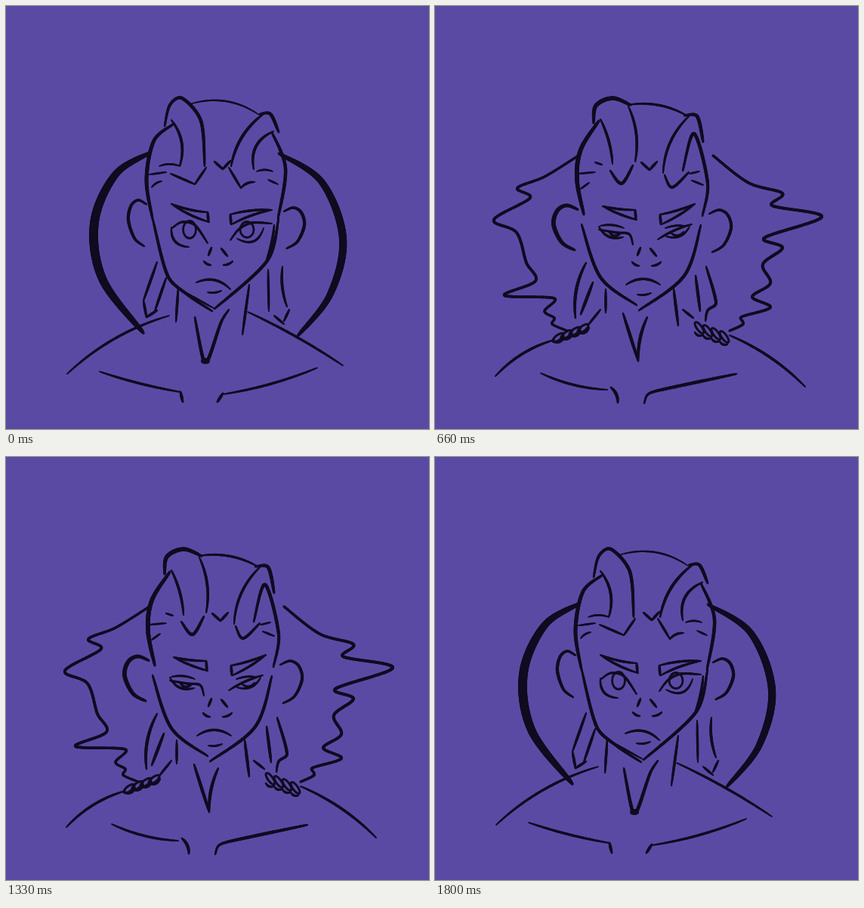
Recreate the animation shown at these times as an HTML page with a canvas. Size 560 by 560 pixels, loop 2 s.

```html
<!DOCTYPE html>
<html lang="en">
<head>
<meta charset="utf-8">
<title>Sketch portrait</title>
<style>
html, body { margin: 0; width: 100%; height: 100%; overflow: hidden; background: #5b4aa4; }
canvas { display: block; }
</style>
</head>
<body>
<canvas id="stage" width="560" height="560"></canvas>
<script>
const ctx = document.getElementById('stage').getContext('2d');
const PAPER = '#5b4aa4', INK = '#110b20', PRESSURE = 1.12;

// Bezier handle along a -> c, never longer than the span allows
function handle(a, c, span) {
  const dx = c[0] - a[0], dy = c[1] - a[1], len = Math.hypot(dx, dy) || 1;
  const k = Math.min(len / 6, span * 0.35) / len;
  return [dx * k, dy * k];
}

// Smooth line through a few points
function through(flat) {
  const pts = [];
  for (let i = 0; i < flat.length; i += 2) pts.push([flat[i], flat[i + 1]]);
  const at = i => pts[Math.max(0, Math.min(pts.length - 1, i))];
  const out = [pts[0]];
  for (let i = 0; i < pts.length - 1; i++) {
    const a = pts[i], b = pts[i + 1], span = Math.hypot(b[0] - a[0], b[1] - a[1]);
    const ha = handle(at(i - 1), b, span), hb = handle(a, at(i + 2), span);
    const steps = Math.ceil(span / 2);
    for (let s = 1; s <= steps; s++) {
      const u = s / steps, v = 1 - u;
      out.push([0, 1].map(k => v * v * v * a[k] + 3 * v * v * u * (a[k] + ha[k]) +
        3 * v * u * u * (b[k] - hb[k]) + u * u * u * b[k]));
    }
  }
  return out;
}

// Brush line: width w in the middle, thinning to the share "tip" at both ends
function brush(w, tip, pts) {
  const n = pts.length - 1;
  for (let i = 0; i < n; i++) {
    const press = Math.sqrt(Math.sin(Math.PI * (i + 0.5) / n));
    ctx.lineWidth = PRESSURE * w * (tip + (1 - tip) * press);
    ctx.beginPath();
    ctx.moveTo(...pts[i]);
    ctx.lineTo(...pts[i + 1]);
    ctx.stroke();
  }
}
const ink = (w, ...flat) => brush(w, 0.45, through(flat));
const even = (w, ...flat) => brush(w, 0.8, through(flat));
const swell = (w, ...flat) => brush(w, 0.2, through(flat));

// Arched line; a positive bend bulges to the left of the way it runs
function bow(w, x0, y0, x1, y1, bend = 0) {
  const dx = x1 - x0, dy = y1 - y0, n = Math.ceil(Math.hypot(dx, dy) / 2), pts = [];
  for (let i = 0; i <= n; i++) {
    const t = i / n, lift = 4 * t * (1 - t) * bend;
    pts.push([x0 + dx * t + dy * lift, y0 + dy * t - dx * lift]);
  }
  brush(w, 0.45, pts);
}

function oval(w, x, y, rx, ry, turn = 0) {
  ctx.lineWidth = w;
  ctx.beginPath();
  ctx.ellipse(x, y, rx, ry, turn, 0, 7);
  ctx.stroke();
}

// Shared parts of the face
function ear(w, x, y, reach, h) {
  ink(w, x, y + h * 0.09, x + reach * 0.46, y, x + reach * 0.85, y + h * 0.12,
    x + reach, y + h * 0.43, x + reach * 0.66, y + h * 0.83, x + reach * 0.13, y + h);
}

function brow(x, y, inX, inY, bend) {
  bow(3, x, y, inX, inY, bend);
  bow(3, x, y, inX + 2, inY + 13, bend);
  bow(3.3, inX, inY, inX + 1, inY + 13);
}

function peak(x, y) {
  bow(3.2, x - 11, y - 10, x, y);
  bow(3.2, x, y, x + 10, y - 11);
}

function noseBridge() {
  bow(3.2, 272, 320, 268, 330);
  bow(3.2, 285, 321, 293, 331);
}

function noseAndMouth(x, y, mouthX, mouthY, drop) {
  bow(3, x, y, x + 9, y + 5, -0.1);
  bow(3, x + 26, y + 5, x + 38, y, -0.1);
  bow(3.1, mouthX, mouthY, mouthX + 45, mouthY + drop, 0.17);
  bow(2.6, mouthX + 15, mouthY + 13, mouthX + 33, mouthY + 11, -0.08);
}

function ringHair() {
  swell(10.5, 191,194, 145,223, 117,287, 128,362, 182,433);
  swell(9, 361,195, 418,233, 446,308, 429,382, 386,437);
  // horns and skull
  ink(4, 210,159, 217,131, 233,122, 258,152, 263,212);
  bow(3.4, 219,151, 230,212, 0.13);
  ink(4.5, 222,156, 196,178, 186,230, 194,282);
  bow(2.2, 243,130, 335,144, 0.12);
  bow(3.6, 298,212, 342,142, 0.1);
  ink(4, 336,143, 350,143, 361,167);
  bow(3.4, 328,216, 354,166, 0.2);
  ink(4, 352,167, 370,215, 360,282);
  // hairline
  peak(287, 216);
  bow(2.5, 190,223, 212,220);
  bow(2.5, 193,240, 206,232, 0.1);
  bow(2.5, 203,212, 230,212, 0.1);
  bow(3, 218,222, 250,236);
  bow(3, 250,236, 265,214);
  bow(3, 295,214, 311,241);
  bow(3, 311,241, 329,233, 0.12);
  bow(2.4, 332,219, 353,219, 0.1);
  bow(2.4, 347,230, 360,236);
  // ears and brows
  ear(3.8, 186, 257, -24, 61);
  ear(3.8, 368, 267, 27, 54);
  brow(219, 262, 267, 273, -0.04);
  brow(352, 270, 297, 276, -0.04);
  // eyes
  ink(3, 220,294, 233,286, 250,290, 267,314);
  bow(3, 219,293, 242,319, -0.25);
  oval(2.8, 243, 296, 8.5, 11.5);
  ink(3, 297,310, 309,295, 326,287, 352,288);
  bow(2.8, 306,308, 341,294, -0.3);
  oval(2.8, 319, 296, 9, 10.5);
  noseBridge();
  noseAndMouth(262, 338, 252, 366, 9);
  // jaw
  ink(3.8, 194,281, 214,357, 240,382, 273,404);
  bow(2.4, 226,373, 275,400);
  ink(3.8, 361,281, 346,337, 276,401);
  bow(3.4, 355,290, 343,342, 0.04);
  // earrings and neck
  bow(3.3, 200,339, 182,390);
  bow(3.3, 182,390, 186,412);
  bow(3.3, 186,412, 200,403);
  bow(3.3, 212,360, 197,404);
  bow(3, 347,349, 348,404);
  bow(3.3, 366,345, 372,398, -0.06);
  bow(3, 375,402, 368,417);
  bow(3, 355,410, 368,421);
  bow(3.2, 228,374, 225,418);
  bow(3.2, 322,369, 313,435);
  ink(4, 250,412, 261,467, 268,467, 285,418, 295,402);
  oval(4, 264, 470, 4, 2);
  // shoulders and collar
  bow(3, 216,410, 81,487, -0.06);
  bow(3, 320,405, 446,476, 0.02);
  bow(3, 124,484, 231,511, -0.02);
  bow(3.6, 231,511, 234,524);
  bow(3.6, 280,524, 287,513);
  bow(3, 287,514, 412,479, -0.03);
}

function looseHair() {
  even(3.4, 190,198, 145,226, 109,241, 126,254, 78,283, 108,300, 121,340, 133,364,
    92,383, 158,387, 145,404, 158,413, 155,421, 175,430);
  even(3.6, 368,198, 415,234, 460,248, 446,264, 512,279, 436,307, 460,320, 434,342,
    444,367, 420,385, 444,399, 405,412, 408,421, 390,430);
  // horns and skull
  ink(5, 210,155, 213,132, 235,122, 259,131);
  bow(3.3, 256,133, 265,206, 0.08);
  bow(3.3, 219,150, 235,209, 0.05);
  ink(3.8, 232,218, 247,235, 262,211);
  bow(2.9, 255,131, 335,146, 0.09);
  ink(5.2, 217,152, 193,190, 188,230, 197,276);
  bow(3.2, 337,145, 302,221, -0.1);
  ink(3.4, 304,224, 314,240, 336,220);
  ink(4.2, 330,145, 347,146, 355,180);
  ink(4, 328,218, 343,169, 361,235, 354,278);
  // hairline
  peak(284, 217);
  bow(2.6, 212,207, 221,210);
  bow(2.4, 190,222, 212,220);
  bow(2.6, 193,242, 204,234);
  bow(2.4, 337,222, 350,219);
  bow(2.6, 340,231, 355,237);
  // ears and brows
  ear(5, 189, 264, -32, 59);
  ear(3.6, 363, 270, 29, 56);
  brow(222, 265, 265, 270, -0.03);
  brow(344, 262, 298, 276, 0.03);
  // half-open eyes
  bow(2.6, 219,291, 250,294, 0.08);
  ink(3, 217,296, 240,300, 257,302, 262,316);
  bow(3, 217,292, 249,306, -0.2);
  bow(3, 230,298, 246,301, -0.3);
  bow(3, 295,309, 340,289, 0.04);
  bow(2.8, 306,305, 337,292, -0.2);
  bow(2.6, 305,294, 330,291, 0.06);
  bow(3, 313,301, 329,299, -0.25);
  noseBridge();
  noseAndMouth(261, 339, 253, 369, 0);
  // jaw
  ink(3.8, 194,289, 219,359, 267,396);
  ink(3.8, 352,290, 330,357, 270,403);
  // earrings and neck
  bow(3.8, 200,340, 186,413, -0.08);
  bow(3.8, 209,366, 193,408);
  bow(3.6, 345,357, 351,404);
  ink(3.6, 359,345, 372,393, 361,403, 358,417);
  bow(3, 226,375, 226,406);
  bow(3.6, 316,375, 322,423);
  bow(3, 219,402, 203,422);
  bow(3, 328,402, 342,413);
  bow(3.8, 249,407, 269,470);
  bow(3.8, 269,470, 281,412, 0.06);
  // braids on the shoulders
  for (let i = 0; i < 4; i++) {
    oval(3, 163 + i * 11, 439 - i * 4, 8.5, 3.4, -0.65);
    bow(3, 158 + i * 11, 445 - i * 4, 171 + i * 11, 438 - i * 4, -0.2);
    oval(3, 350 + i * 11, 426 + i * 4, 9, 3.4, 0.95);
    bow(3, 344 + i * 11, 432 + i * 4, 354 + i * 11, 436 + i * 4, -0.2);
  }
  // shoulders and collar
  bow(3.2, 158,442, 80,490, -0.07);
  bow(3.2, 390,436, 490,504, 0.05);
  bow(3, 140,486, 228,508, -0.05);
  bow(3.8, 233,505, 242,525, 0.12);
  ink(3.8, 277,526, 282,514, 300,508, 399,487);
}

function wavyHair() {
  even(3.3, 181,205, 152,216, 165,225, 160,232, 67,243, 167,264);
  even(3.5, 168,264, 3,296, 141,308, 80,328, 135,339, 20,374, 138,366, 157,385,
    88,406, 160,404, 157,416, 180,426);
  even(3.8, 374,199, 391,208, 379,218, 430,224, 445,234, 421,245, 497,257, 392,278,
    534,284, 417,314, 478,321, 441,336, 545,347, 378,380, 526,382, 398,412,
    430,422, 406,431, 432,444, 421,447);
  // horns and skull
  ink(4, 208,157, 232,129, 259,136);
  bow(3.8, 254,138, 261,222, 0.08);
  ink(3.8, 218,154, 234,222, 243,239, 254,210);
  bow(3, 259,136, 328,145, 0.13);
  ink(4.2, 325,145, 340,142, 351,170);
  ink(4, 321,155, 304,200, 312,242, 328,213);
  bow(3.6, 328,199, 345,173, 0.12);
  ink(4, 345,172, 364,220, 355,280);
  ink(4.6, 219,155, 192,182, 186,240, 199,301);
  // hairline
  peak(280, 218);
  bow(2.6, 211,209, 222,216);
  bow(2.4, 196,222, 211,226);
  bow(2.6, 192,244, 203,237);
  bow(2.6, 334,220, 343,209);
  bow(2.6, 332,226, 345,229);
  bow(2.6, 342,238, 351,246);
  // ears and brows
  ear(4.2, 185, 267, -26, 67);
  ear(4.4, 358, 268, 33, 59);
  brow(225, 266, 266, 275, 0);
  brow(336, 264, 298, 275, 0.06);
  // closed eyes
  bow(3.2, 221,296, 257,305, -0.08);
  bow(3.4, 257,305, 256,313);
  bow(3.2, 300,310, 336,291, -0.12);
  // nose and mouth
  bow(3, 264,332, 278,326, 0.15);
  bow(3, 284,327, 293,331);
  noseAndMouth(259, 342, 256, 373, 1);
  // jaw
  bow(3.8, 204,317, 257,388, -0.11);
  bow(3.8, 348,281, 336,349, 0.07);
  bow(3.8, 340,354, 275,399, 0.02);
  // earrings and neck
  bow(3.6, 196,342, 184,418, -0.06);
  bow(3.6, 204,369, 183,420);
  bow(3.7, 338,362, 355,412);
  ink(3.7, 351,349, 366,388, 356,408);
  bow(3.6, 222,373, 231,414);
  bow(3, 221,395, 204,421, 0.1);
  bow(3.6, 316,373, 315,403, -0.1);
  bow(3, 322,397, 341,421);
  bow(4, 251,413, 277,471);
  bow(4, 277,471, 284,418);
  // fringe: a scalloped edge with tufts below it
  for (let i = 0; i < 5; i++) {
    const x = 143 + i * 12, y = 443 - i * 3.5, rx = 341 + i * 11, ry = 424 + i * 4;
    bow(3.2, x, y, x + 13, y - 4, 0.5);
    bow(3.4, x, y + 4, x + 9, y + 22);
    bow(3.4, x + 9, y + 22, x + 8, y + 2);
    bow(3.2, rx, ry, rx + 12, ry + 4, 0.45);
    bow(3.4, rx + 3, ry + 6, rx + 6, ry + 24);
    bow(3.4, rx + 6, ry + 24, rx + 10, ry + 6);
  }
  // shoulders
  bow(3.2, 141,446, 86,487, -0.08);
  bow(3.2, 399,447, 477,500, 0.07);
}

function poseAt(ms) {
  if (ms < 660 || ms >= 1500) return ringHair;
  return ms < 830 || ms >= 1330 ? looseHair : wavyHair;
}

let shown;
function tick() {
  const pose = poseAt(performance.now() % 2000);
  if (pose !== shown) {
    shown = pose;
    ctx.fillStyle = PAPER;
    ctx.fillRect(0, 0, 560, 560);
    pose();
  }
  requestAnimationFrame(tick);
}
ctx.strokeStyle = INK;
ctx.lineCap = ctx.lineJoin = 'round';
tick();
</script>
</body>
</html>
```
